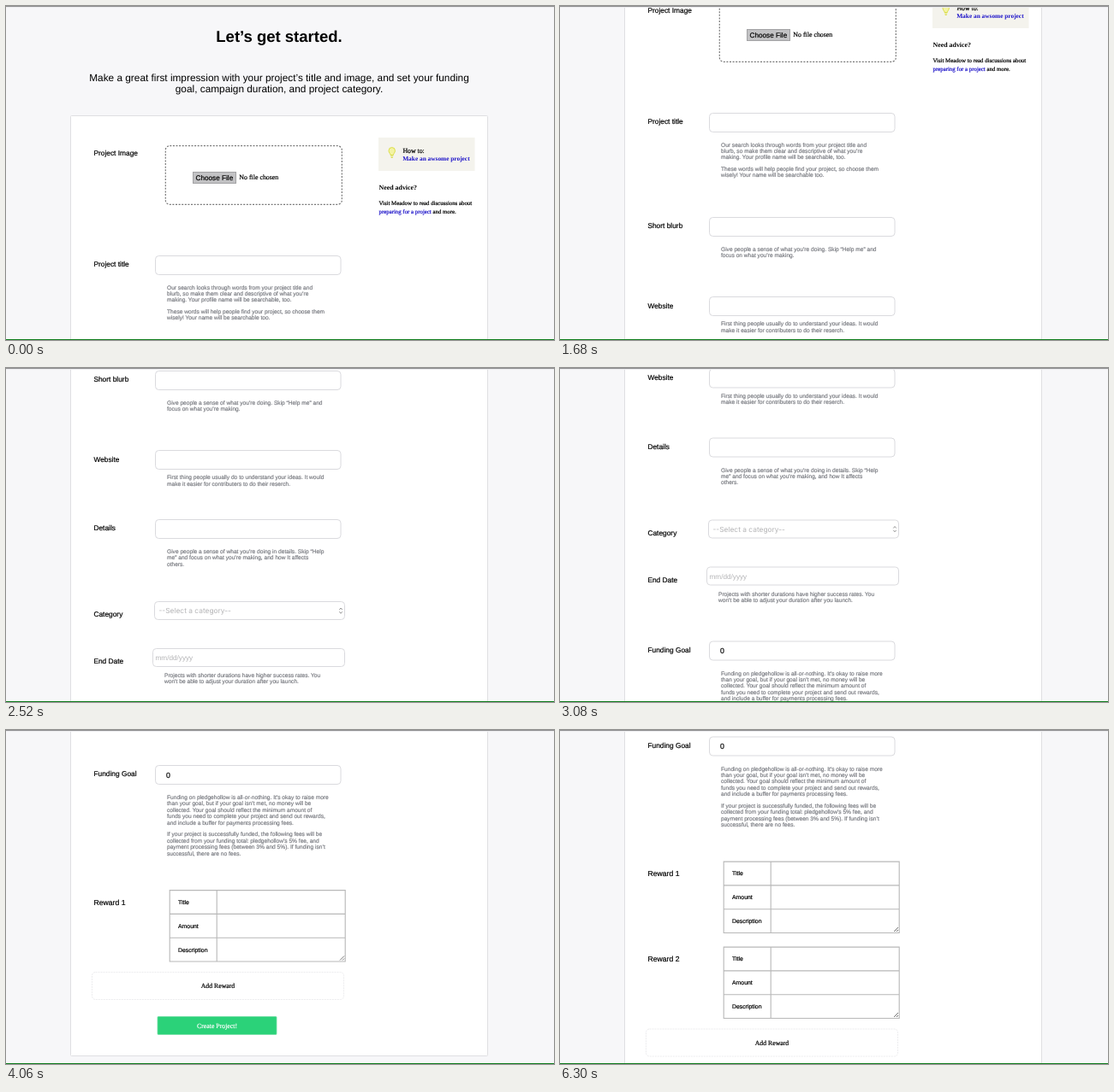
An HTML page for the animation above (6.37 s loop, 640x391 px).

```html
<!DOCTYPE html>
<html lang="en">
<head>
<meta charset="utf-8">
<title>Project form</title>
<style>
  html, body { margin: 0; width: 100%; height: 100%; overflow: hidden; background: #f7f7f9; }
  svg { display: block; width: 640px; height: 391px; }
  text {
    font-family: "Liberation Sans", Arial, sans-serif;
    text-rendering: geometricPrecision;
    color: #000; fill: currentColor; stroke: currentColor; stroke-width: .2;
  }
  tspan { fill: currentColor; stroke: currentColor; }
  .serif { font-family: "Liberation Serif", Times, serif; }
  .inter { font-family: Inter, sans-serif; }
  .bold { font-weight: bold; stroke-width: 0; }
  .thin { stroke-width: 0; }
  .mid { text-anchor: middle; }
  .hint { color: #7c7e84; }
  .pale { color: #b4b4b6; stroke-width: 0; }
  .link { color: #1a10c8; }
  .white { color: #fff; }
  .field { fill: #fff; stroke: #dadade; }
  .grid { fill: none; stroke: #b8b8b8; stroke-width: 1.1; }
</style>
</head>
<body>
<svg viewBox="0 0 640 391">
  <g id="page"></g>
  <rect width="640" height="1" fill="#8f8f91"/>
  <rect y="1" width="640" height="1" fill="#ececee"/>
  <rect y="390" width="640" height="1" fill="#0f7d1c"/>
</svg>
<script>
const text = (x, y, size, str, cls = "") =>
  `<text x="${x}" y="${y}" font-size="${size}" class="${cls}">${str}</text>`;
const rect = (x, y, w, h, r, attrs) =>
  `<rect x="${x}" y="${y}" width="${w}" height="${h}" rx="${r}" ${attrs}/>`;
const label = (y, str) => text(102.4, y, 8.37, str);
const field = (y, x = 174.5, w = 216.5, h = 22) => rect(x, y, w, h, 4, 'class="field"');
const hint = (y, lines, x = 188) =>
  lines.map((s, i) => text(x, y + i * 7.4, 6.62, s, "hint")).join("");

const reward = n =>
  text(102.4, 989.6, 8.7, "Reward " + n) +
  '<path class="grid" d="M191.2 972.6H396.2V1056H191.2ZM191.2 1000.4H396.2M191.2 1028.2H396.2M246.2 972.6V1056"/>' +
  '<path d="M390 1054.5L395 1049.5M393 1054.5L395 1052.5" stroke="#555" stroke-width=".8"/>' +
  ["Title", "Amount", "Description"].map((s, i) => text(201, 988.9 + i * 27.8, 6.9, s)).join("");

const header =
  text(319, 42.3, 18.5, "Let’s get started.", "bold mid") +
  text(319, 87.6, 11.84, "Make a great first impression with your project’s title and image, and set your funding", "mid thin") +
  text(319, 101.2, 11.84, "goal, campaign duration, and project category.", "mid thin");

const upload =
  label(174.8, "Project Image") +
  rect(186.3, 163.7, 206, 68.6, 5, 'fill="none" stroke="#777" stroke-width="1.2" stroke-dasharray="2 1.6"') +
  rect(218.5, 194.5, 50, 13, 0, 'fill="#c2c2c4" stroke="#a2a2a4"') +
  text(221.5, 204, 8.2, "Choose File") +
  text(272.3, 203.4, 7.9, "No file chosen", "serif");

const advice =
  rect(435, 154, 112.5, 39, 0, 'fill="#f4f3ed"') +
  '<path d="M449 174.5C449 172.5 447 172 447 169.3A3.7 3.7 0 0 1 454.4 169.3C454.4 172 452.4 172.5 452.4 174.5ZM449.2 176H452.2M449.7 177.5H451.7" fill="#f3f3a4" stroke="#d8dc3c" stroke-width=".9"/>' +
  text(463.4, 172, 7.8, "How to:", "serif") +
  text(463.2, 181.4, 7.35, "Make an awsome project", "serif bold link") +
  text(435.5, 214.6, 7.9, "Need advice?", "serif bold") +
  text(435.5, 233, 6.84, "Visit Meadow to read discussions about", "serif") +
  text(435.5, 242.5, 6.84, '<tspan class="link">preparing for a project</tspan> and more.', "serif");

const form =
  label(304.7, "Project title") + field(292.5) +
  hint(331.5, ["Our search looks through words from your project title and",
    "blurb, so make them clear and descriptive of what you’re",
    "making. Your profile name will be searchable, too."]) +
  hint(360, ["These words will help people find your project, so choose them",
    "wisely! Your name will be searchable too."]) +
  label(427, "Short blurb") + field(414.5) +
  hint(453.5, ["Give people a sense of what you’re doing. Skip “Help me” and",
    "focus on what you’re making."]) +
  label(520.8, "Website") + field(507.5) +
  hint(541.3, ["First thing people usually do to understand your ideas. It would",
    "make it easier for contributers to do their reserch."]) +
  label(601, "Details") + field(588.5) +
  hint(628, ["Give people a sense of what you’re doing in details. Skip “Help",
    "me” and focus on what you’re making, and how It affects", "others."]) +
  label(702, "Category") + field(684.5, 173.5, 222, 21) +
  text(178.5, 698, 8.4, "--Select a category--", "inter pale") +
  '<path d="M389.3 694L391 692L392.7 694M389.3 696.3L391 698.3L392.7 696.3" fill="none" stroke="#888" stroke-width=".9"/>' +
  label(757, "End Date") + field(739.5, 171.5, 224, 21) +
  text(174.5, 753.2, 8.2, "mm/dd/yyyy", "pale") +
  hint(773, ["Projects with shorter durations have higher success rates. You",
    "won’t be able to adjust your duration after you launch."], 185) +
  label(839, "Funding Goal") + field(826.5) +
  text(187, 840.7, 8.8, "0") +
  hint(866, ["Funding on pledgehollow is all-or-nothing. It’s okay to raise more",
    "than your goal, but if your goal isn’t met, no money will be",
    "collected. Your goal should reflect the minimum amount of",
    "funds you need to complete your project and send out rewards,",
    "and include a buffer for payments processing fees."]) +
  hint(909.3, ["If your project is successfully funded, the following fees will be",
    "collected from your funding total: pledgehollow’s 5% fee, and",
    "payment processing fees (between 3% and 5%). If funding isn’t",
    "successful, there are no fees."]);

const footer =
  rect(100.5, 1068.5, 294, 32, 4, 'fill="none" stroke="#ececee" stroke-dasharray="2 1"') +
  text(247.5, 1087.2, 7.77, "Add Reward", "serif mid") +
  rect(177, 1120.5, 139, 21, 1, 'fill="#2bd279" stroke="#6fdfa3" stroke-width=".8"') +
  text(246.5, 1133.8, 7.8, "Create Project!", "serif mid white");

const page = document.getElementById("page");
page.innerHTML = header +
  rect(75.5, 128.5, 487, 1038, 1, 'id="card" fill="#fff" stroke="#dfdfe2"') +
  upload + advice + form + reward(1) +
  `<g id="extra" transform="translate(0 100)">${reward(2)}</g><g id="footer">${footer}</g>`;
const [card, extra, foot] = ["card", "extra", "footer"].map(id => document.getElementById(id));

// Scroll position over time: [ms, px]
const scroll = [[0, 0], [1050, 0], [1120, 5], [1260, 44], [1820, 208], [2100, 290], [2520, 411],
  [2660, 440], [2870, 460], [2940, 460], [3150, 530], [3430, 690], [3570, 748], [3780, 773],
  [4060, 785], [4340, 787], [4410, 787], [4480, 788], [6160, 788], [6230, 802], [6300, 818.5]];
const LOOP = 6370, STEP = 70, ADDED = 5600;

function scrollAt(t) {
  const i = scroll.findIndex(k => k[0] >= t);
  if (i < 1) return scroll[0][1];
  const [t0, y0] = scroll[i - 1], [t1, y1] = scroll[i];
  return Math.round(2 * (y0 + (y1 - y0) * (t - t0) / (t1 - t0))) / 2;
}

function draw(now) {
  const t = Math.floor(now % LOOP / STEP) * STEP;
  const grow = t >= ADDED ? 100 : 0;
  page.setAttribute("transform", `translate(0 ${-scrollAt(t)})`);
  extra.setAttribute("visibility", grow ? "visible" : "hidden");
  foot.setAttribute("transform", `translate(0 ${grow})`);
  card.setAttribute("height", 1038 + grow);
  requestAnimationFrame(draw);
}
draw(performance.now());
</script>
</body>
</html>
```
